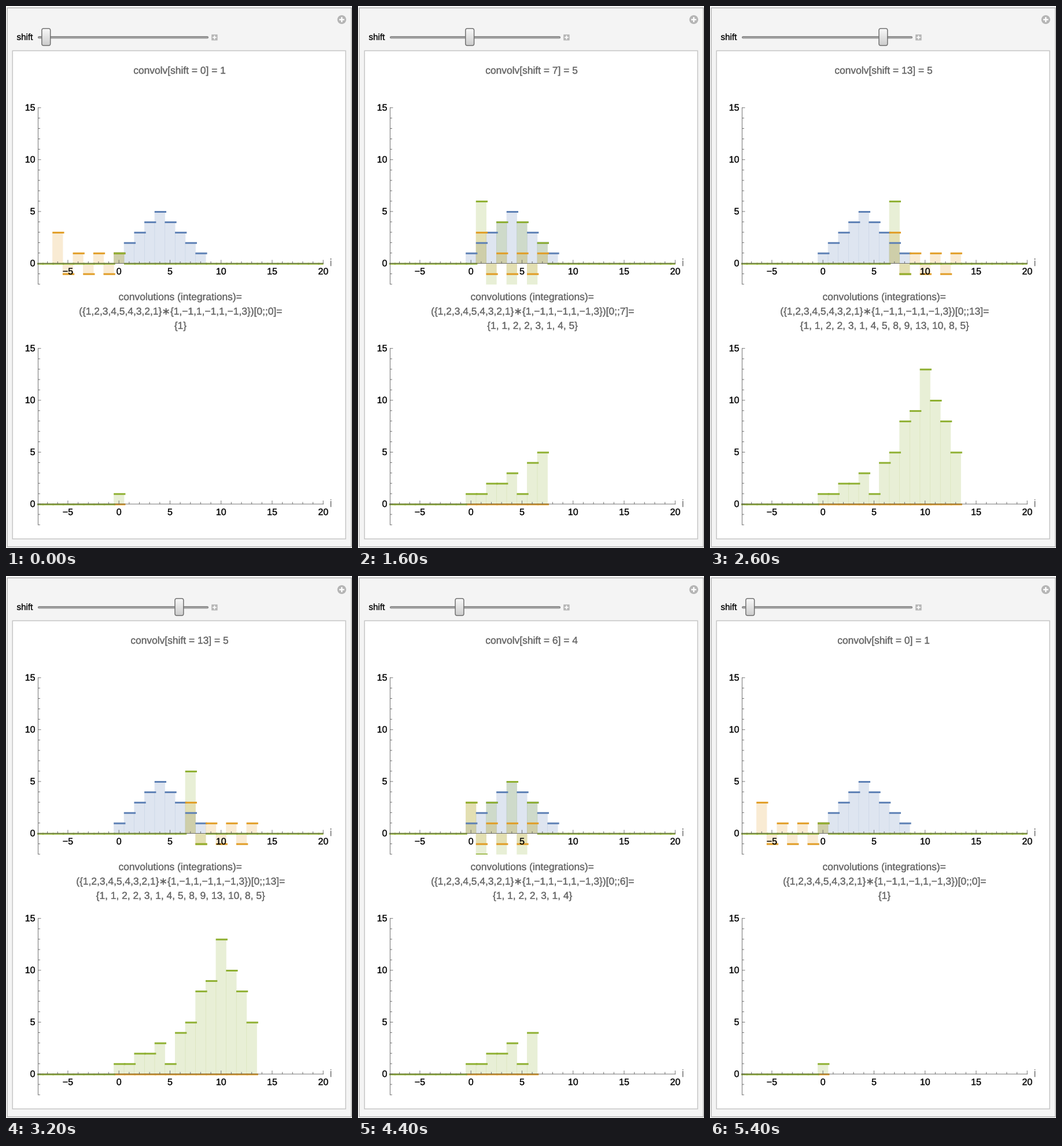
Animation of 598x936 px, one loop 6000 ms. Source, as a matplotlib script:

```python
import math

import matplotlib.pyplot as plt
import numpy as np
from matplotlib.animation import FuncAnimation
from matplotlib.collections import PatchCollection
from matplotlib.patches import Circle, FancyBboxPatch, Rectangle
from matplotlib.patheffects import Stroke

W, H, DPI = 598, 936, 64
PT = 72 / DPI  # points per pixel
BLUE, ORANGE, GREEN = "#5e81b5", "#e19c24", "#8fb032"
GRAY, AXIS = "#636363", "#5c5c5c"
TITLE, TICK = 17.4, 16  # text sizes in pixels

SIGNAL = [1, 2, 3, 4, 5, 4, 3, 2, 1]
KERNEL = [1, -1, 1, -1, 1, -1, 3]
RESULT = [int(v) for v in np.convolve(SIGNAL, KERNEL)] + [0]
MAX_SHIFT = 15

X_ZERO, UNIT_X, UNIT_Y = 195.2, 17.65, 17.92
X_LEFT, X_RIGHT = 54, 548.6
TOP_AXIS, LOW_AXIS = 444.5, 860.1

plt.rcParams.update({
    "font.family": ["Liberation Sans", "DejaVu Sans"],
    "path.snap": False,
    "toolbar": "None",
})

fig = plt.figure(figsize=(W / DPI, H / DPI), dpi=DPI, facecolor="white")
ax = fig.add_axes([0, 0, 1, 1])
ax.set(xlim=(0, W), ylim=(H, 0))
ax.set_autoscale_on(False)
ax.axis("off")


def px(i):
    return X_ZERO + i * UNIT_X


def label(x, y, text, size, color="black", ha="center"):
    # A hairline outline gives the slightly heavier desktop text weight.
    outline = Stroke(linewidth=0.4 * PT, foreground=color)
    return ax.text(x, y, text, fontsize=size * PT, color=color, ha=ha,
                   va="baseline", zorder=6, path_effects=[outline])


def stroke(xs, ys, color, width, z=1, cap="butt", alpha=1):
    ax.plot(xs, ys, color=color, lw=width * PT, zorder=z,
            solid_capstyle=cap, alpha=alpha)


def box(x0, y0, x1, y1, face, edge, width):
    ax.add_patch(Rectangle((x0, y0), x1 - x0, y1 - y0, fc=face, ec=edge,
                           lw=width * PT, zorder=0))


def plus(x, y, arm, width):
    stroke([x - arm, x + arm], [y, y], "white", width, 3)
    stroke([x, x], [y - arm, y + arm], "white", width, 3)


def draw_window():
    box(2.2, 3.2, 597, 934, "#f4f4f4", "#b4b4b4", 1.5)
    box(11.3, 77.3, 587, 920.3, "white", "#c6c6c6", 1.5)
    ax.add_patch(Circle((580.3, 23.5), 7.6, fc="#b5b5b5", ec="none", zorder=2))
    plus(580.3, 23.5, 4.4, 2.4)
    box(355.2, 49.2, 365.6, 59.4, "#b5b5b5", "none", 0)
    plus(360.4, 54.3, 3.4, 1.8)
    label(18.5, 58.7, "shift", 15.2, ha="left")
    stroke([57, 348], [54.2, 54.2], "#868686", 4.2, cap="round")
    stroke([57, 348], [54.7, 54.7], "#a9a9a9", 1.8, cap="round")


def draw_axes(zero):
    style = dict(color=AXIS, width=1, z=4, alpha=0.85)
    stroke([X_LEFT + 0.5, 549], [zero, zero], **style)
    stroke([55.5, 55.5], [zero - 15 * UNIT_Y - 0.5, zero + 2 * UNIT_Y + 0.5], **style)
    for i in range(-7, 21):
        size = 3.5 if i % 5 else 6
        stroke([px(i)] * 2, [zero - size, zero], **style)
        if i % 5 == 0:
            label(px(i), zero + 19, str(i).replace("-", "\u2212"), TICK)
    for v in range(-2, 16):
        y = zero - v * UNIT_Y
        stroke([55.5, 59 if v % 5 else 60.5], [y, y], **style)
        if v % 5 == 0:
            label(50.5, y + 5, str(v), TICK, ha="right")
    label(561.7, zero + 4.5, "i", TITLE, GRAY)


moving = []


def clip_to_plot(artist, zero):
    bottom, top = zero + 36.5, zero - 270.5
    artist.set_clip_path(Rectangle((X_LEFT, bottom), 498, top - bottom,
                                   transform=ax.transData))
    moving.append(artist)


def draw_lines(values, color, zero):
    if not values:
        return
    index = np.array(list(values))
    heights = zero + 0.6 - np.array(list(values.values())) * UNIT_Y
    left = px(index - 0.5) - 0.2
    right = np.minimum(px(index + 0.5) + 2.4, X_RIGHT)
    lines = ax.hlines(heights, left, right, color=color, lw=3 * PT, zorder=3)
    clip_to_plot(lines, zero)


def draw_steps(values, color, zero):
    """Filled bars of unit width with a thick line at each value."""
    bars = [Rectangle((px(i - 0.5) - 0.3, zero + 0.4), UNIT_X + 0.6, -v * UNIT_Y)
            for i, v in values.items() if v]
    fill = PatchCollection(bars, facecolor=color, edgecolor="none",
                           alpha=0.2, linewidth=0, zorder=2)
    clip_to_plot(ax.add_collection(fill, autolim=False), zero)
    draw_lines(values, color, zero)


def draw_thumb(shift):
    x, y, w, h = 61.9 + 17.7 * shift, 38.9, 14.8, 29.4
    thumb = FancyBboxPatch((x, y), w, h, boxstyle="round,pad=0,rounding_size=3.2",
                           fc="none", ec="#707070", lw=1.5 * PT, zorder=5)
    ax.add_patch(thumb)
    shade = np.interp(np.linspace(0, 1, 32), [0, 0.5, 1], [0.98, 0.89, 0.80])
    face = ax.imshow(shade[:, None], cmap="gray", vmin=0, vmax=1, aspect="auto",
                     extent=(x, x + w, y + h, y), zorder=4.5)
    face.set_clip_path(thumb)
    moving.extend([thumb, face])


def shift_at(frame):
    steps = math.floor((frame - 5.82) / 1.633) + 1
    steps = min(max(steps, 0), 2 * MAX_SHIFT)
    return MAX_SHIFT - abs(MAX_SHIFT - steps)


def braces(values, sep):
    return "{" + sep.join(str(v).replace("-", "\u2212") for v in values) + "}"


def update(frame):
    while moving:
        moving.pop().remove()
    shift = shift_at(frame)
    draw_thumb(shift)

    signal = dict(enumerate(SIGNAL))
    kernel = {shift - k: v for k, v in enumerate(KERNEL)}
    product = {i: signal.get(i, 0) * kernel.get(i, 0) for i in range(-8, 21)}
    draw_steps(signal, BLUE, TOP_AXIS)
    draw_steps(kernel, ORANGE, TOP_AXIS)
    draw_steps(product, GREEN, TOP_AXIS)

    sums = RESULT[:shift + 1]
    draw_lines({i: 0 for i in range(shift + 1)}, ORANGE, LOW_AXIS)
    draw_lines({i: 0 for i in range(-8, 0)}, GREEN, LOW_AXIS)
    draw_steps(dict(enumerate(sums)), GREEN, LOW_AXIS)

    formula = f"({braces(SIGNAL, ',')}\u2217{braces(KERNEL, ',')})[0;;{shift}]="
    moving.extend([
        label(300.5, 117, f"convolv[shift = {shift}] = {sums[-1]}", TITLE, GRAY),
        label(301.5, 508, "convolutions (integrations)=", TITLE, GRAY),
        label(301.2, 533, formula, TITLE, GRAY),
        label(301.5, 557.7, braces(sums, ", "), TITLE, GRAY),
    ])
    return moving


draw_window()
draw_axes(TOP_AXIS)
draw_axes(LOW_AXIS)
anim = FuncAnimation(fig, update, frames=60, interval=100, repeat=True,
                     repeat_delay=0, blit=False)
plt.show()
```
